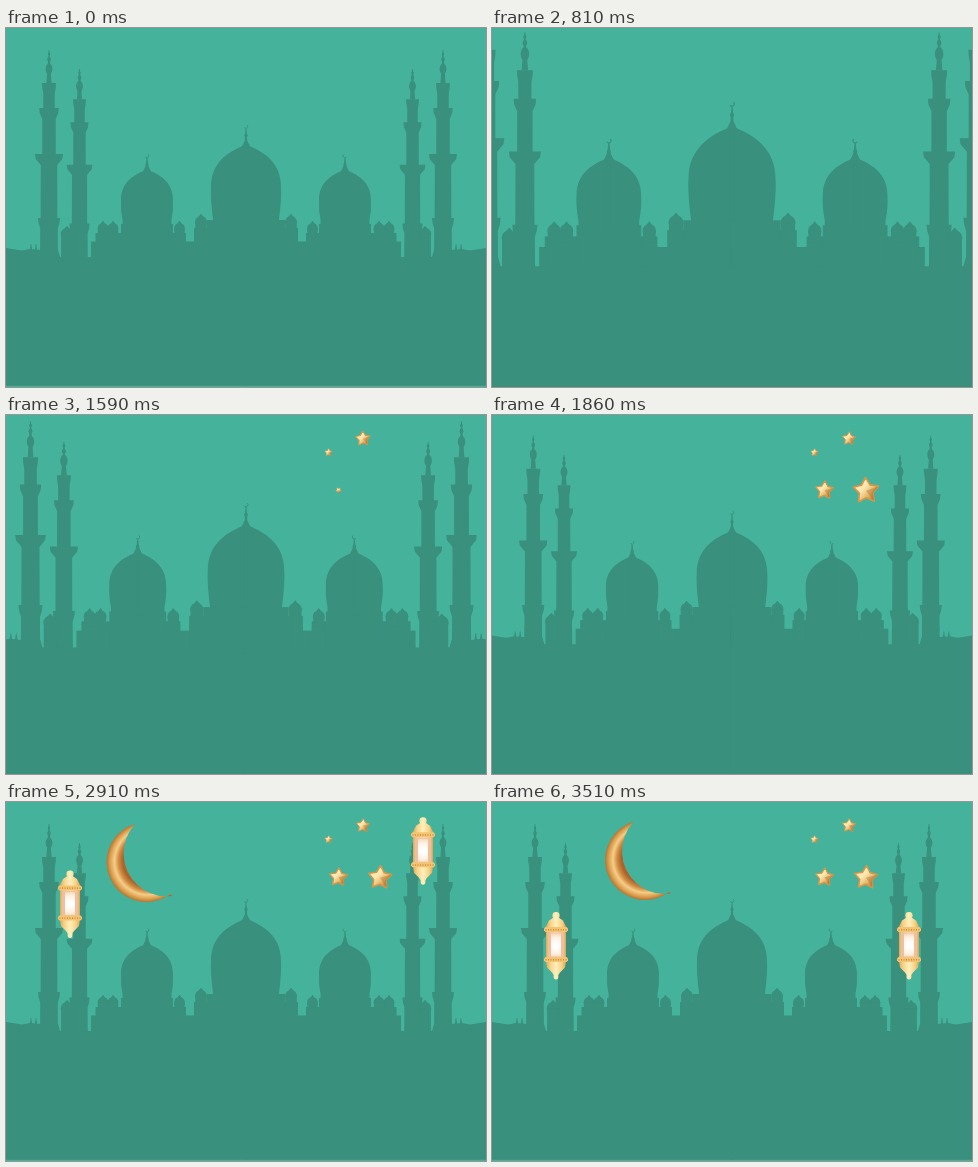
An HTML page with a canvas for the animation above (4.44 s loop, 480 by 359 pixels).

```html
<!DOCTYPE html>
<html lang="en">
<head>
<meta charset="utf-8">
<title>Mosque night</title>
<style>
html, body { margin: 0; width: 100%; height: 100%; overflow: hidden; background: #45b39c; }
canvas { display: block; width: 100%; height: 100%; }
</style>
</head>
<body>
<canvas id="stage" width="480" height="359"></canvas>
<script>
const W = 480, H = 359, LOOP = 4440, STEP = 30, DEG = Math.PI / 180;
const SKY = '#45b39c', CITY = '#38907d';
const g = document.getElementById('stage').getContext('2d');

const progress = (t, start, length) => Math.min(1, Math.max(0, (t - start) / length));
const easeInOut = p => p < .5 ? 2 * p * p : 1 - 2 * (1 - p) ** 2;
const easeOutBack = p => 1 + 2.7 * (p - 1) ** 3 + 1.7 * (p - 1) ** 2;
const bezier = (a, b, c, d, u) =>
  a * (1 - u) ** 3 + 3 * b * u * (1 - u) ** 2 + 3 * c * u * u * (1 - u) + d * u ** 3;

function gradient(make, ...colors) {
  colors.forEach((c, i) => make.addColorStop(i / (colors.length - 1), c));
  return make;
}

function polygon(points) {
  g.beginPath();
  points.forEach(([x, y]) => g.lineTo(x, y));
  g.closePath();
}

function oval(x, y, rx, ry) {
  g.beginPath();
  g.ellipse(x, y, rx, ry, 0, 0, 7);
  g.fill();
}

// Symmetric shape from rows of [y, half width].
function turned(cx, ...rows) {
  const side = s => rows.map(([y, w]) => [cx + s * w, y]);
  polygon([...side(-1), ...side(1).reverse()]);
  g.fill();
}

/* ---------- skyline ---------- */
const GROUND = 230, FLOOR = 357.7;
// Height below the tip, half width of the balcony and of the shaft under it.
const TIERS = [[33, 7, 5.7], [58, 9.8, 6.7], [104, 14, 8.2], [168, 11, 8.6]];

const box = (left, top, right, bottom = GROUND) => g.fillRect(left, top, right - left, bottom - top);

function minaret(cx, tip, k) {
  const at = y => tip + k * y;
  turned(cx, [tip, .4], [at(12), 1], [at(33), 2.6]);
  for (let i = 0; i < 3; i++) oval(cx, at(4 + 3 * i + 2.2 * i * i), 1.2 + .55 * i * i, 1.5 + i * i);
  for (const [y, lip, shaft] of TIERS)
    turned(cx, [at(y), k * lip], [at(y + 5), k * lip * .95], [at(y + 11), k * shaft], [GROUND, k * shaft * 1.03]);
}

function dome(cx, top, mid, base, w) {
  const h = mid - top;
  g.beginPath();
  for (const s of [-1, 1]) {
    const x = f => cx + s * w * f;
    g.moveTo(cx, top);
    g.bezierCurveTo(x(.48), top + h * .16, x(1), mid - h * .6, x(1), mid);
    g.quadraticCurveTo(x(1.02), mid + 11, x(.94), base - 8);
    g.lineTo(x(.94), base);
    g.lineTo(cx, base);
    g.closePath();
  }
  g.fill('evenodd');
  box(cx - 1, top + 1, cx + 1, base);
}

function finial(cx, tip, base) {
  turned(cx, [tip + 4, .5], [base - 4, 1.2], [base + 2, 4]);
  oval(cx, tip + 11, 1.6, 2);
  g.lineWidth = .9;
  g.strokeStyle = CITY;
  g.beginPath();
  g.arc(cx, tip + 2, 1.8, -.9, 2.6);
  g.stroke();
}

function cupola(cx, top, r, base) {
  turned(cx, [top - 1, .3], [top + 3, r * .55]);
  oval(cx, top + r + 1, r, r);
  box(cx - r * .95, top + r + 1, cx + r * .95, base);
}

function skylineHalf() {
  minaret(43, 22, 1);
  minaret(73.5, 41, .92);
  polygon([[0, 220], [16, 222.5], [24, 221], [35, 222], [52, 222], [54, 229], [241, 229], [241, FLOOR], [0, FLOOR]]);
  g.fill();
  for (const x of [25, 30]) turned(x, [216, .3], [223, 1.3]);
  cupola(61, 199, 6.2, GROUND);

  box(85, 213.5, 241);
  box(89.5, 205, 180);
  box(115, 196, 167);
  for (const x of [97, 107, 173.5]) cupola(x, 194, 5.4, 210);
  dome(141, 141.5, 172, 200, 26);
  finial(141, 126, 141.5);

  box(188, 200, 241);
  box(201, 192, 241);
  cupola(195, 187, 6, 206);
}

function skyline(zoom) {
  g.save();
  g.translate(240, 191);
  g.scale(zoom, zoom);
  g.translate(-240, -191);
  g.fillStyle = CITY;
  dome(240, 116.5, 159, 200, 35);
  finial(240, 96.5, 116.5);
  skylineHalf();
  g.translate(W, 0);
  g.scale(-1, 1);
  skylineHalf();
  g.restore();
}

/* ---------- stars ---------- */
const STARS = [[322.5, 37.5, 4], [357, 23.7, 7], [332.5, 75.3, 9.4], [374, 75.7, 12]];

function star(x, y, r, turn, size) {
  const spokes = Array.from({ length: 10 }, (_, i) => {
    const a = i * 36 * DEG - 90 * DEG, d = i % 2 ? r * .54 : r;
    return [Math.cos(a) * d, Math.sin(a) * d];
  });
  g.save();
  g.translate(x, y);
  g.rotate(turn);
  g.scale(size, size);
  polygon(spokes);
  g.fillStyle = gradient(g.createLinearGradient(-r * .6, -r * .6, r * .7, r * .7),
    '#fff0bd', '#fbe6ae', '#e3b465', '#b06a2c');
  g.fill();
  g.lineJoin = 'round';
  g.lineWidth = r * .13;
  g.strokeStyle = '#d9964a';
  g.stroke();
  polygon([[0, 0], spokes[2], spokes[3], spokes[4]]);
  g.fillStyle = 'rgba(160,95,35,.35)';
  g.fill();
  g.restore();
}

function stars(t) {
  STARS.forEach(([x, y, r], i) => {
    const size = easeOutBack(progress(t, 1290 + i * 140, 270));
    if (size > 0) star(x, y, r, .05 + (1 - size) * .9, size);
  });
}

/* ---------- moon ---------- */
function moon(t) {
  const u = easeInOut(progress(t, 1957, 1132));
  g.save();
  g.translate(bezier(54, 54, 66, 153, u), bezier(-60, 35, 75, 58, u));
  g.rotate(9 * (1 - u) * DEG);
  g.beginPath();
  g.arc(0, 0, 40, 52.6 * DEG, 252.5 * DEG);
  g.arc(20, -9, 43, 222 * DEG, 82 * DEG, true);
  g.closePath();
  g.fillStyle = gradient(g.createRadialGradient(4, -2, 19, 0, 0, 40.5),
    '#dc9a4a', '#b56d2c', '#a9622a', '#cf8b40', '#f5cd88', '#dda150', '#b26c2e');
  g.fill();
  g.restore();
}

/* ---------- lanterns ---------- */
function chain(bottom) {
  g.lineWidth = .8;
  g.strokeStyle = 'rgba(176,160,84,.8)';
  for (let y = bottom, wide = true; y > -8; y -= 6, wide = !wide) {
    g.beginPath();
    g.ellipse(0, y - 3, wide ? 1.8 : .5, 3.8, 0, 0, 7);
    g.stroke();
  }
}

// Measured upwards from the lowest point of the lantern.
function lantern(x, bottom) {
  if (bottom <= 0) return;
  g.save();
  g.translate(x, bottom);
  chain(-66);
  g.fillStyle = gradient(g.createLinearGradient(-12, 0, 12, 0),
    '#d9923f', '#f6d184', '#fff0be', '#f6d184', '#d58d3c');
  oval(0, -64, 3.6, 3.4);
  turned(0, [-62, 2.5], [-59, 7], [-53, 10], [-49, 10]);
  turned(0, [-18, 10], [-12, 9], [-7, 4], [-4, 2]);
  oval(0, -3, 2.4, 3);
  box(-10, -50, 10, -18);

  g.fillStyle = '#ecc0a0';
  box(-8.2, -47, 8.2, -22);
  g.fillStyle = gradient(g.createRadialGradient(0, -34, 2, 0, -34, 14), '#ffffff', '#fff2e2', '#f0cdb0');
  box(-5, -46, 5, -23);

  for (const y of [-50, -20]) {
    g.fillStyle = '#f3c572';
    turned(0, [y - 2.5, 10.5], [y - 1, 12], [y + 1, 12], [y + 2.5, 10.5]);
    g.fillStyle = '#d08a40';
    for (let i = -4; i <= 4; i++) box(i * 2.5 - .5, y - .5, i * 2.5 + .5, y + 1);
  }
  g.restore();
}

// Falls a little too far, then settles back.
function drop(t, start) {
  return -40 + 224 * easeInOut(progress(t, start, 995)) - 6.5 * easeInOut(progress(t, start + 995, 127));
}

/* ---------- playback ---------- */
function draw(t) {
  const grow = easeInOut(progress(t, 0, 910));
  const shrink = easeInOut(progress(t, 1080, 900));
  g.fillStyle = SKY;
  g.fillRect(0, 0, W, H);
  skyline(1 + .25 * (grow - shrink));
  stars(t);
  moon(t);
  lantern(64, drop(t, 2241));
  lantern(417, drop(t, 2388));
}

const began = performance.now();
function tick() {
  const t = (performance.now() - began) % LOOP;
  draw(Math.floor(t / STEP) * STEP);
  requestAnimationFrame(tick);
}
tick();
</script>
</body>
</html>
```
